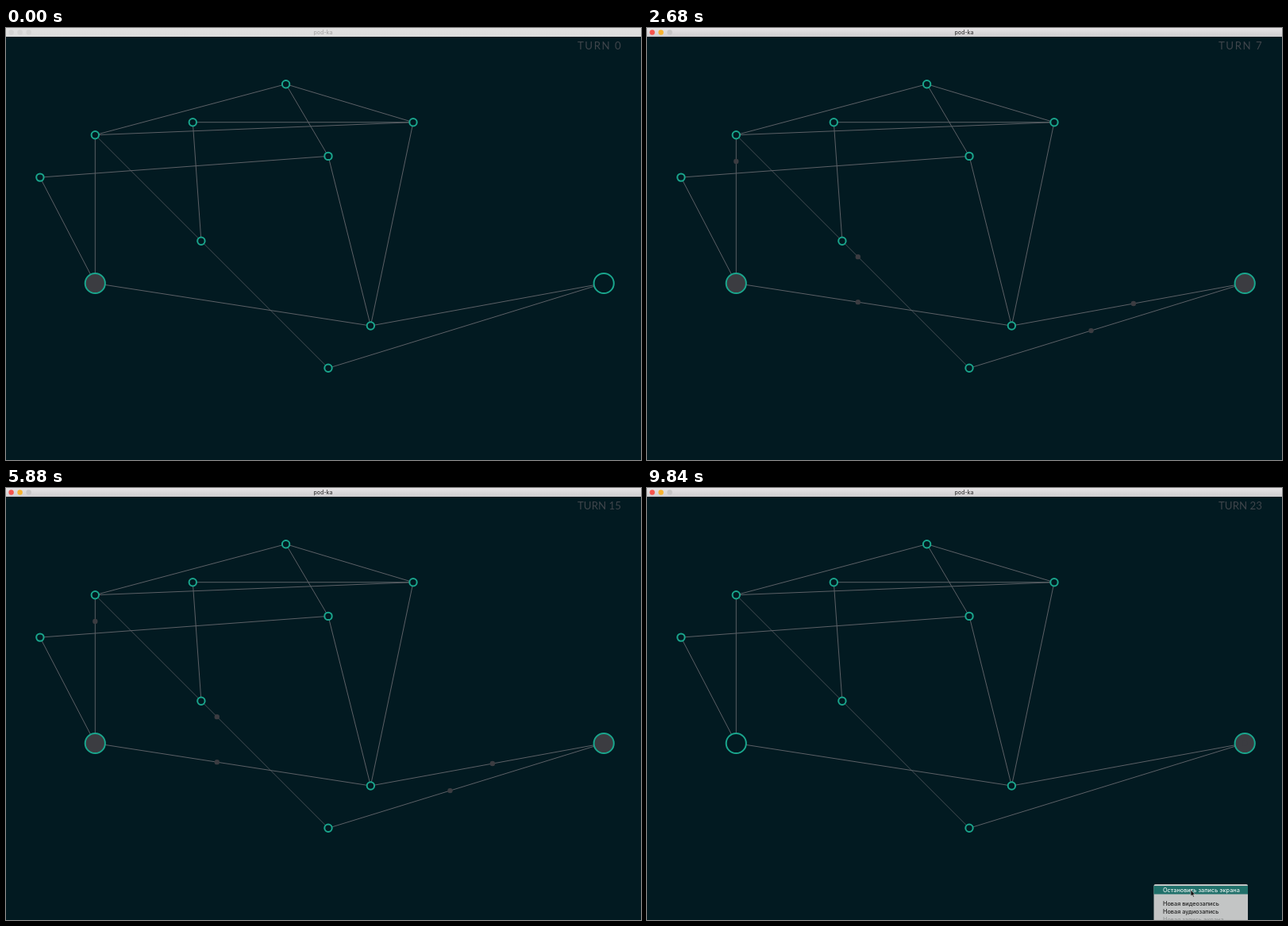
Recreate the animation shown at these times as an HTML page with a canvas. Size 800x544 px, loop 9880 ms.

```html
<!DOCTYPE html>
<html lang="en">
<head>
<meta charset="utf-8">
<title>Graph walk</title>
<style>
  html, body { margin: 0; width: 100%; height: 100%; overflow: hidden; background: #021a21; }
  canvas { display: block; }
</style>
</head>
<body>
<canvas id="stage" width="800" height="544"></canvas>
<script>
const ctx = document.getElementById('stage').getContext('2d');

const LOOP = 9880, TICK = 40, TURN_TICKS = 10, LAST_TURN = 23;
const FIRST_TURN_AT = 120, MENU_AT = 9840, FOCUS_AT = 80;
const BACK = '#021a21', RING = '#1aa68d', LINE = '#5c6066', ANT = '#3b3c41';

const nodes = {
  start: [112.3, 321.5], end: [753.2, 321.5], hub: [459.4, 375], low: [406, 428.3],
  fork: [112.3, 134.7], top: [352.6, 70.7], right: [513, 118.7], inner: [235.3, 118.7],
  mid: [406, 161.4], left: [42.9, 188.1], knot: [245.9, 268.2]
};

const edges = ['start left', 'start fork', 'start hub', 'fork top', 'fork right', 'fork low',
  'top right', 'top mid', 'inner right', 'inner knot', 'left mid', 'mid hub', 'right hub',
  'hub end', 'low end'].map(e => e.split(' '));

// One ant leaves along each route every turn until its supply runs out.
const routes = [
  { ants: 22, stops: ['start', 'hub', 'end'] },
  { ants: 20, stops: ['start', 'fork', 'low', 'end'] }
];

function disc(x, y, r, fill) {
  ctx.beginPath();
  ctx.arc(x, y, r, 0, Math.PI * 2);
  ctx.fillStyle = fill;
  ctx.fill();
}

function text(str, x, y, font, fill, align = 'left') {
  ctx.font = font;
  ctx.fillStyle = fill;
  ctx.textAlign = align;
  ctx.fillText(str, x, y);
}

function drawTitleBar(active) {
  const shade = ctx.createLinearGradient(0, 0, 0, 11);
  shade.addColorStop(0, active ? '#e6e4e6' : '#e0e0e0');
  shade.addColorStop(1, active ? '#cfcdcf' : '#dcdcdc');
  ctx.fillStyle = shade;
  ctx.fillRect(0, 0, 800, 11);
  const lights = active ? ['#f5544d', '#f7b32f', '#c6c5c6'] : ['#d3d3d3', '#d3d3d3', '#d3d3d3'];
  lights.forEach((color, i) => disc(6.6 + 11 * i, 5.5, 3.2, color));
  text('pod-ka', 399.5, 8, '500 7px Inter, sans-serif', active ? '#3c3b3c' : '#a9a9a9', 'center');
}

function drawTurn(turn) {
  ctx.letterSpacing = turn < 10 ? '1.5px' : '0px';
  text('TURN ' + turn, 720, 27, '13.3px Lato, sans-serif', '#3f454b');
  ctx.letterSpacing = '0px';
}

function drawGraph(startFull, endFull) {
  ctx.strokeStyle = LINE;
  for (const [from, to] of edges) {
    const [a, b] = [nodes[from], nodes[to]];
    ctx.lineWidth = from === 'fork' && to === 'low' ? 0.75 : 1;
    ctx.beginPath();
    ctx.moveTo(...a);
    ctx.lineTo(...b);
    ctx.stroke();
  }
  ctx.strokeStyle = RING;
  ctx.lineWidth = 2;
  for (const name in nodes) {
    const big = name === 'start' || name === 'end';
    const full = name === 'start' ? startFull : name === 'end' && endFull;
    disc(...nodes[name], big ? 12.6 : 4.7, full ? ANT : BACK);
    ctx.stroke();
  }
}

// Ants cover equal distance along the longer axis and wait on arrival.
function drawAnts(turn, distance) {
  for (const { ants, stops } of routes) {
    for (let leg = 0; leg < stops.length - 1; leg++) {
      const ant = turn - leg;
      if (ant < 1 || ant > ants) continue;
      const [x, y] = nodes[stops[leg]];
      const [tx, ty] = nodes[stops[leg + 1]];
      const part = Math.min(1, distance / Math.max(Math.abs(tx - x), Math.abs(ty - y)));
      disc(x + (tx - x) * part, y + (ty - y) * part, 3.2, ANT);
    }
  }
}

function drawMenu() {
  ctx.fillStyle = '#c3c5c5';
  ctx.beginPath();
  ctx.roundRect(638.5, 499, 118.5, 50, 2);
  ctx.fill();
  ctx.fillStyle = '#20706a';
  ctx.fillRect(638.5, 501, 118.5, 10.5);
  const font = '500 7.3px Inter, sans-serif';
  text('Остановить запись экрана', 650, 509, font, '#e4efed');
  text('Новая видеозапись', 650, 525.5, font, '#222');
  text('Новая аудиозапись', 650, 535.5, font, '#222');
  text('Новая запись экрана', 650, 546, font, '#969999');
  ctx.fillStyle = '#111';
  ctx.strokeStyle = '#ddd';
  ctx.lineWidth = 0.6;
  const pointer = new Path2D('M685 506v8l1.9-1.6 1.3 2.8 1.2-.6-1.2-2.7h2.3z');
  ctx.fill(pointer);
  ctx.stroke(pointer);
}

function draw(now) {
  const time = Math.floor((now % LOOP) / TICK) * TICK;
  const tick = (time - FIRST_TURN_AT) / TICK;
  const turn = Math.max(0, Math.min(LAST_TURN, Math.floor(tick / TURN_TICKS) + 1));
  const step = Math.floor(2.4 * (tick - (turn - 1) * TURN_TICKS) + 0.3);
  const distance = 9.5 + 16 * step;

  ctx.fillStyle = BACK;
  ctx.fillRect(0, 0, 800, 544);
  drawTurn(turn);
  drawGraph(turn < 22, turn > 2 || (turn === 2 && distance >= 294));
  drawAnts(turn, distance);
  drawTitleBar(time >= FOCUS_AT);
  if (time >= MENU_AT) drawMenu();
}

const begin = performance.now();
function loop() {
  draw(performance.now() - begin);
  requestAnimationFrame(loop);
}
loop();
</script>
</body>
</html>
```
